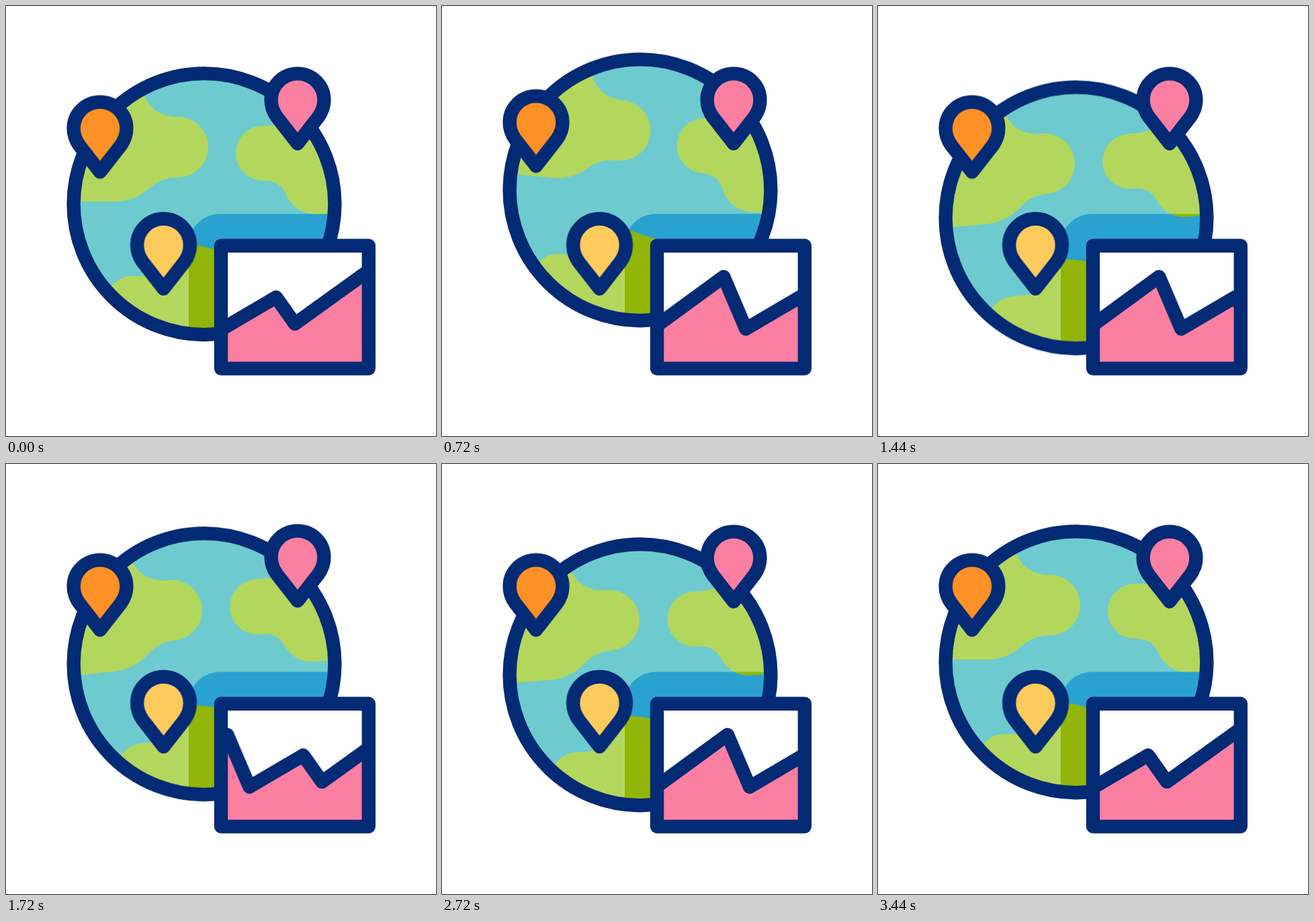
Write an HTML page that moves like this. It is 640x640 px and loops after 3.6 s.

```html
<!DOCTYPE html>
<html lang="en">
<head>
<meta charset="utf-8">
<title>Globe with pins and chart</title>
<style>
  html, body { margin: 0; width: 100%; height: 100%; overflow: hidden; background: #fff; }
  svg { display: block; width: 100%; height: 100%; }

  .line { stroke: #032a75; stroke-width: 20.4; stroke-linejoin: round; }
  .light { --sea: #6dcbcf; --land: #b3d75d; }
  .dark { --sea: #2aa2cf; --land: #91b508; }

  .bob, .spin, .hop, .scroll {
    animation: 3600ms cubic-bezier(.364, 0, .636, 1) infinite;
  }
  .bob { animation-name: bob; }
  .spin { animation-name: spin; transform-origin: 295px 295px; }
  .scroll { animation-name: scroll; }
  .hop { animation-name: hop; animation-delay: var(--wait, 0ms); }

  @keyframes bob {
    0%, 5.556% { transform: translateY(0); }
    22.361% { transform: translateY(-22px); }
    40.278% { transform: translateY(20.5px); }
    57.167% { transform: translateY(-22px); }
    78.944% { transform: translateY(21.5px); }
    95.556%, 100% { transform: translateY(0); }
  }
  @keyframes spin {
    0%, 5.556% { transform: rotate(0deg); }
    26.806% { transform: rotate(8deg); }
    44.528% { transform: rotate(-8deg); }
    59.944% { transform: rotate(8deg); }
    82.083% { transform: rotate(-8deg); }
    95.556%, 100% { transform: rotate(0deg); }
  }
  @keyframes scroll {
    0%, 5.556% { transform: translateX(0); }
    22.222%, 37.778% { transform: translateX(136px); }
    53.611%, 60.833% { transform: translateX(0); }
    75.833%, 79.722% { transform: translateX(136px); }
    95.556%, 100% { transform: translateX(0); }
  }
  @keyframes hop {
    0%, 18.639% { transform: translateY(0); }
    22.14% { transform: translateY(-26px); }
    27.8%, 100% { transform: translateY(0); }
  }
</style>
</head>
<body>
<svg viewBox="0 0 640 640">
  <defs>
    <clipPath id="disc"><circle cx="295" cy="295" r="192"/></clipPath>
    <clipPath id="shade"><path d="M272 530V356A46 46 0 0 1 318 309.5H530V530Z"/></clipPath>
    <clipPath id="window"><rect x="320" y="357" width="220" height="183"/></clipPath>

    <g id="earth" clip-path="url(#disc)">
      <rect x="95" y="95" width="400" height="400" fill="var(--sea)"/>
      <g fill="var(--land)">
        <path d="M90 291H160C181 291 197 285 211 273C226 260 238 255 256 255A45 45 0 0 0 256 165C236 165 221 157 213 146Q208 138 202 127L190 100H80Z"/>
        <path d="M500 309.5H460C440 309.5 424 298 415 277C409 265 399 260 383 260A41 41 0 0 1 383 178H400C418 178 428 170 440 155L500 150Z"/>
        <path d="M140 440C158 409 172 402 190 402H205C222 402 229 394 233 384C240 365 252 355 272 355C290 355 302 362 325 364L420 520H140Z"/>
      </g>
    </g>

    <path id="pin" class="line" d="M0 64.7L-31 25C-36 18 -39.4 9.5 -39.4 0A39.4 39.4 0 0 1 39.4 0C39.4 9.5 36 18 31 25Z"/>
  </defs>

  <g class="light">
    <g class="bob"><g class="spin"><use href="#earth"/></g></g>
  </g>
  <g class="dark" clip-path="url(#shade)">
    <g class="bob"><g class="spin"><use href="#earth"/></g></g>
  </g>
  <g class="bob"><circle class="line" cx="295" cy="294.8" r="194.4" fill="none"/></g>

  <g transform="translate(140 182.2)"><g class="hop"><use href="#pin" fill="#fd9126"/></g></g>
  <g transform="translate(434 140)"><g class="hop" style="--wait: 1033ms"><use href="#pin" fill="#fb7fa0"/></g></g>
  <g transform="translate(234.5 356)"><g class="hop" style="--wait: 2066ms"><use href="#pin" fill="#fdca5c"/></g></g>

  <rect x="320" y="356.8" width="220" height="183" fill="#fff"/>
  <g clip-path="url(#window)">
    <path class="scroll line" fill="#fb7fa0" d="M170 600V490L289 403L322 480.5L402 433.5L430 473L546 389.5V600Z"/>
  </g>
  <rect class="line" x="320" y="356.8" width="219.8" height="182.8" fill="none"/>
</svg>
</body>
</html>
```
